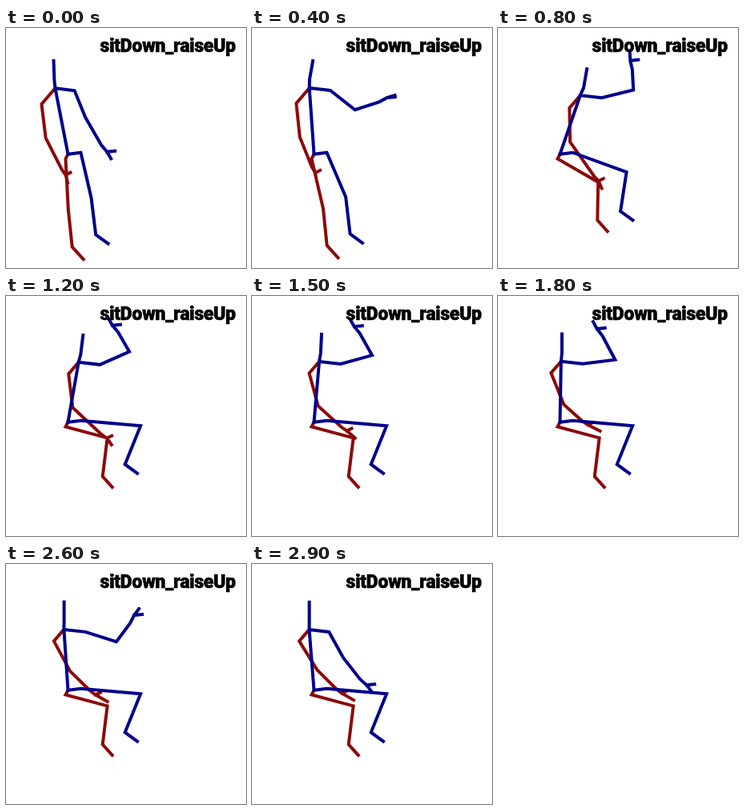
An HTML page for the animation above (3000 ms loop, 300 px wide and 300 px high).

```html
<!DOCTYPE html>
<html lang="en">
<head>
<meta charset="utf-8">
<title>sitDown_raiseUp</title>
<style>
  html, body { margin: 0; width: 100%; height: 100%; overflow: hidden; background: #fff; }
  svg { display: block; width: 100vw; height: 100vh; }
  path { fill: none; stroke-width: 4; stroke-linecap: square; }
  text {
    font: 900 23px Roboto, "Open Sans", sans-serif;
    letter-spacing: -.25px;
    text-anchor: end;
    stroke: #000;
    stroke-width: .6px;
  }
</style>
</head>
<body>
<svg viewBox="0 0 300 300">
  <g transform="translate(.5 .7)">
    <path id="right" stroke="#8b0a0a"/>
    <path id="left" stroke="#00008b"/>
  </g>
  <text x="287" y="29.5">sitDown_raiseUp</text>
</svg>
<script>
const LOOP = 3000, STEP = 100;
const BODY_TIMES = [0, 400, 800, 1200, 1800, 2300, 2900];
const ARM_TIMES = [0, 400, 700, 1200, 1800, 2300, 2900];
const PELVIS = [77, 157], LEFT_HIP = [93, 155], RIGHT_HIP = [74, 162.7];

const mix = (a, b, w) => a + (b - a) * w;
const cosDeg = deg => Math.cos(deg * Math.PI / 180);
const sinDeg = deg => Math.sin(deg * Math.PI / 180);
const add = ([x, y], dx, dy) => [x + dx, y + dy];
const bone = (from, len, deg) => add(from, len * cosDeg(deg), len * sinDeg(deg));

function ease(t, from, to) {
  const u = Math.min(1, Math.max(0, (t - from) / (to - from)));
  return u * u * (3 - 2 * u);
}

// Smooth curve through the values that never overshoots them.
function track(times, ...vals) {
  const slopes = vals.slice(1).map((v, i) => (v - vals[i]) / (times[i + 1] - times[i]));
  const tangents = vals.map((_, i) => {
    const a = slopes[i - 1], b = slopes[i];
    if (a === undefined) return b;
    if (b === undefined) return a;
    return a * b > 0 ? 2 * a * b / (a + b) : 0;
  });
  return t => {
    let i = 0;
    while (i < times.length - 2 && t >= times[i + 1]) i++;
    const h = times[i + 1] - times[i], u = (t - times[i]) / h, w = 1 - u;
    return w * w * ((1 + 2 * u) * vals[i] + u * h * tangents[i])
         + u * u * ((3 - 2 * u) * vals[i + 1] - w * h * tangents[i + 1]);
  };
}

// Bone angles in degrees, plus the foreshortening of the forearms.
const lean = track(BODY_TIMES, -101, -94, -71, -80, -89, -93, -94.5);
const headTilt = track(BODY_TIMES, -92, -80, -80, -83, -90, -90, -90);
const leftUpper = track(ARM_TIMES, 68, 38, -9, -24, -7, -8.5, 61);
const leftFore = track(ARM_TIMES, 60, -18, -82, -120, -118, -117, 52);
const leftReach = track(ARM_TIMES, 40, 32, 26, 28, 34, 26, 34);
const rightUpper = track(BODY_TIMES, 83, 84, 89, 83, 68, 65, 58);
const rightFore = track(BODY_TIMES, 63, 68, 55, 43, 42, 44, 45);
const rightReach = track(BODY_TIMES, 44, 40, 52, 49, 31, 36, 34);

const line = (...points) => 'M' + points.map(p => p.map(n => n.toFixed(2))).join('L');

function leftSide(t, neck, sit, fold) {
  const throat = bone(neck, 10.3, lean(t) + 5);
  const head = bone(throat, 24, headTilt(t));

  const up = leftUpper(t), fore = leftFore(t);
  const shoulder = add(neck, 22.5 + 4.5 * cosDeg(up), 3);
  const elbow = bone(shoulder, 33 + 8 * cosDeg(up), up);
  const wrist = bone(elbow, leftReach(t), fore);
  const hand = bone(wrist, 11, fore - 10);

  const knee = bone(LEFT_HIP, mix(58, 75, sit), mix(77, 5, sit));
  const ankle = bone(knee, mix(46.5, 52, fold), mix(83, 112, fold));

  return line(PELVIS, neck, throat, head)
    + line(neck, shoulder, elbow, wrist, hand, bone(hand, 10, fore))
    + line(hand, add(hand, 10, -1))
    + line(PELVIS, LEFT_HIP, knee, ankle, bone(ankle, 19, 36));
}

function rightSide(t, neck, sit, fold) {
  const fore = rightFore(t), settle = ease(t, 1200, 1800);
  const shoulder = add(neck, mix(-17, -12.5, sit), mix(20, 14.5, sit));
  const elbow = bone(shoulder, 42.5, rightUpper(t));
  const wrist = bone(elbow, rightReach(t), fore);
  const hand = bone(wrist, 8.5, fore - 8);
  const finger = bone(hand, mix(10, 17, settle), fore + mix(12, -15, settle));

  const knee = bone(RIGHT_HIP, mix(64, 54, fold), mix(87, 15, sit));
  const ankle = bone(knee, mix(46.5, 48.5, fold), mix(84, 97, fold));

  return line(neck, shoulder, elbow, wrist, hand, finger)
    + line(hand, add(hand, 6, -3))
    + line(PELVIS, RIGHT_HIP, knee, ankle, bone(ankle, mix(21, 18, sit), 48));
}

function render(t) {
  const sit = ease(t, 200, 1050);   // thighs swing up
  const fold = ease(t, 350, 1200);  // shins follow
  const neck = bone(PELVIS, mix(84, 76, sit), lean(t));
  left.setAttribute('d', leftSide(t, neck, sit, fold));
  right.setAttribute('d', rightSide(t, neck, sit, fold));
}

const left = document.getElementById('left');
const right = document.getElementById('right');
const start = performance.now();
function tick() {
  const t = (performance.now() - start) % LOOP;
  render(Math.floor(t / STEP) * STEP);
  requestAnimationFrame(tick);
}
tick();
</script>
</body>
</html>
```
